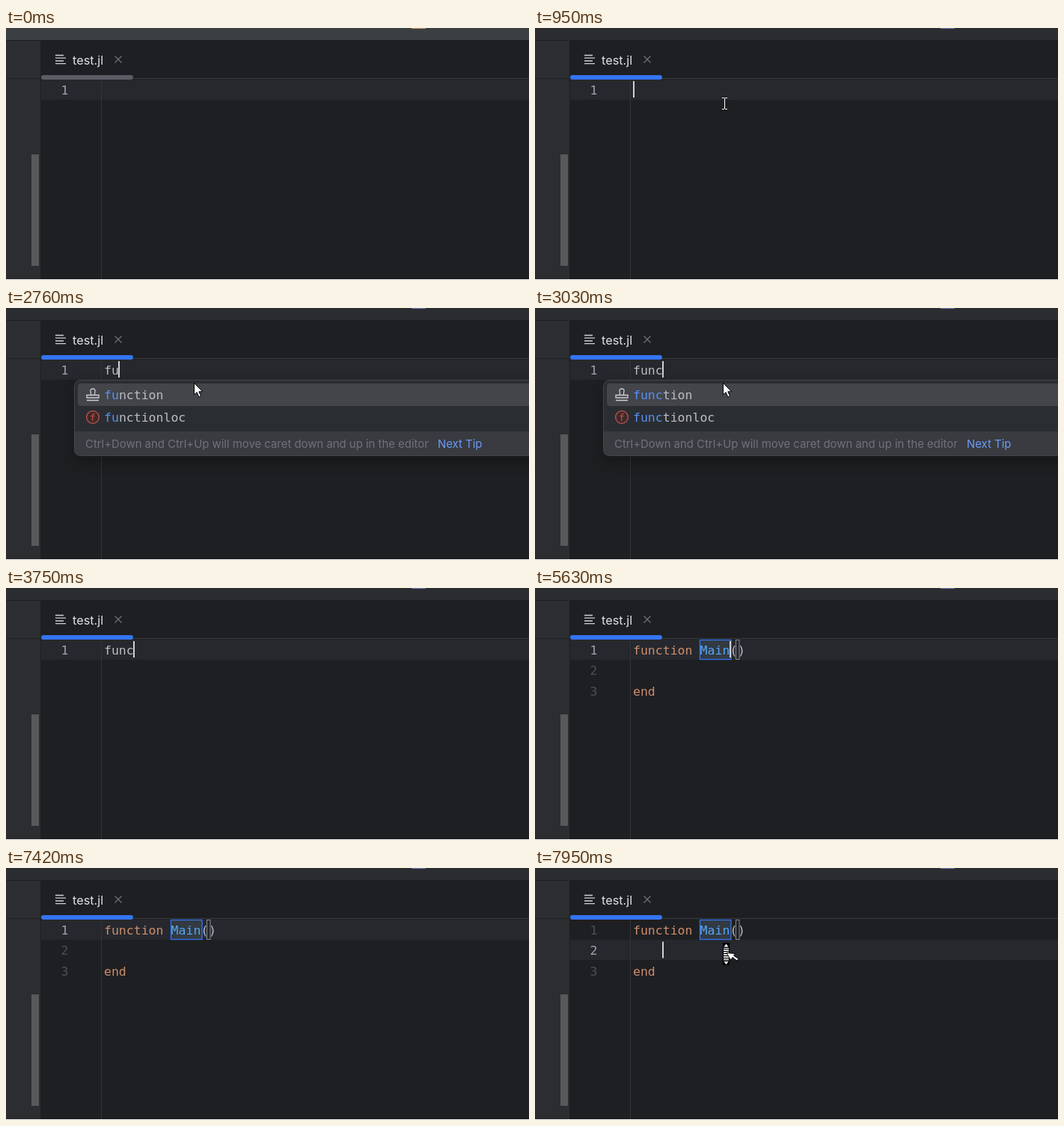
Recreate the animation shown at these times as an HTML page. Size 699 by 337 pixels, loop 8 s.

```html
<!DOCTYPE html>
<html lang="en">
<head>
<meta charset="utf-8">
<title>Editor completion</title>
<style>
  html, body { margin: 0; width: 100%; height: 100%; overflow: hidden; background: #fff; }
  svg { display: block; }
  text { white-space: pre; }
  .mono { font: 16.5px "DejaVu Sans Mono", monospace; fill: #bcbec4; }
  .ui { font: 16.25px Inter, sans-serif; fill: #dfe1e5; }
  .tip { font: 14.9px Inter, sans-serif; fill: #6f737a; }
  .kw { fill: #cf8e6d; }
  .match { fill: #5a90f5; }
  .link { fill: #6b9bfa; }
  .dim { fill: #7a7e85; }
  .line { fill: none; stroke: #ced0d6; stroke-width: 1.3; }
</style>
</head>
<body>
<svg width="699" height="337" viewBox="0 0 699 337">
  <defs>
    <filter id="shadow" x="-10%" y="-40%" width="120%" height="200%">
      <feDropShadow dx="0" dy="8" stdDeviation="12" flood-color="#000" flood-opacity=".3"/>
    </filter>
    <clipPath id="stage"><rect width="699" height="336"/></clipPath>
  </defs>
  <rect width="699" height="337" fill="#fff"/>
  <g clip-path="url(#stage)">
    <rect width="699" height="336" fill="#1e1f22"/>
    <rect width="46" height="336" y="17" fill="#2b2d30"/>
    <rect id="titleBar" width="699" height="16"/>
    <rect id="titleMark" x="542" width="19" height="1" rx=".5"/>
    <rect id="lineBg" x="47" width="652" height="27" fill="#26282e"/>
    <path d="M0 67.5H46" stroke="#1e1f22"/>
    <path d="M47 67.5H699" stroke="#393b40"/>
    <path d="M127.5 69V336" stroke="#313438"/>
    <rect x="34" y="169" width="10" height="149" fill="#58595b"/>

    <path d="M66 36.5H77M66 40.2H80M66 44H77M66 47.7H80" stroke="#ced0d6" stroke-width="1.3"/>
    <text class="ui" x="89" y="49">test.jl</text>
    <path d="M145.5 37.5l9 9m0-9l-9 9" stroke="#6f737a" stroke-width="1.2"/>
    <rect id="tabLine" x="47" y="63" width="123" height="6" rx="3"/>

    <g id="numbers"></g>
    <text id="typed" class="mono" x="131" y="89"></text>
    <g id="snippet">
      <text class="mono kw" x="131" y="89">function</text>
      <text class="mono kw" x="131" y="144">end</text>
      <rect id="nameBox" x="220.5" y="69.5" height="26" stroke="#3574f0" stroke-width="1.3"/>
      <text id="name" class="mono" x="220.6" y="89" style="fill:#56a8f5"></text>
      <g id="parens">
        <text class="mono" x="260.4" y="89">(</text>
        <text class="mono" x="271" y="89">)</text>
        <rect x="268.5" y="69.5" width="4.5" height="26" fill="none" stroke="#868a91"/>
      </g>
    </g>
    <rect id="caret" width="2" height="22" fill="#ced0d6"/>

    <path id="opening" d="M92 340V105Q92 97 100 97H705" fill="none" stroke="#43454a" stroke-width="2"/>
    <g id="popups"></g>

    <path id="beam" d="M0 .5H3M4 .5H7M3.5 1V15M0 15.5H3M4 15.5H7" fill="none" stroke="#fff"/>
    <path id="arrow" transform="translate(251.5 100.5)" fill="#fff" stroke="#000"
      d="M0 0V15.5L3.6 12.2L6.4 18.5L9 17.4L6.3 11.3H11.2Z"/>
    <g id="drag">
      <rect x="251" y="100" width="9" height="30" fill="#000"/>
      <path d="M252.5 105.5h6l-3-4ZM252.5 125h6l-3 4Z" fill="#fff"/>
      <path d="M252 107.5h7M252 123h7" stroke="#fff"/>
      <path d="M255.5 109V122" stroke="#ddd" stroke-width="7" stroke-dasharray="2 1"/>
      <path d="M256 113.5L268 114.5L265.5 117L272 121.5L270 124L264 119.5L261.5 123Z" fill="#fff" stroke="#000"/>
    </g>
  </g>
</svg>
<script>
const LOOP = 8000, ADVANCE = 9.95;
const el = id => document.getElementById(id);
const show = (id, on) => el(id).style.display = on ? "" : "none";
const between = (t, a, b) => t >= a && t < b;
// Value of the last [time, value] pair already reached.
const at = (t, steps) => steps.reduce((v, [time, next]) => t >= time ? next : v, steps[0][1]);
const caretX = column => Math.round(130.5 + ADVANCE * column);

const badge = (y, letter, color, fill) => `
  <circle cx="116" cy="${y}" r="8.3" fill="${fill}" stroke="${color}" stroke-width="1.3"/>
  <text x="116" y="${y + 4.5}" text-anchor="middle" font-size="13"
    font-family="DejaVu Sans Mono, monospace" fill="${color}">${letter}</text>`;

const stamp = `<path class="line" d="M113.5 116V114Q111.5 108 116 108T118.5 114V116
  M108 120V116.5H124V120ZM108 123.5H124"/>`;

const folder = `<path class="line" d="M117 152.5H110Q108 152.5 108 150.5V141.5Q108 139.5 110 139.5H113.5L116 142
  H121.5Q123.5 142 123.5 144V147"/>
  <rect x="118" y="148.5" width="7.5" height="7" rx="1.5" fill="#25324d" stroke="#548af7" stroke-width="1.3"/>`;

function popup(id, dx, icons, rows) {
  const items = rows.map(([word, note], i) => `
    <text class="mono" x="131" y="${122 + 30 * i}"><tspan class="match"></tspan><tspan
      data-word="${word}"></tspan></text>
    <text class="mono dim" x="261" y="${122 + 30 * i}">${note || ""}</text>`).join("");
  return `<g id="${id}" transform="translate(${dx} 0)">
    <rect x="91.5" y="96.5" width="660" height="101" rx="8" fill="#2b2d30" filter="url(#shadow)"/>
    <path d="M91.5 165H752V197.5H99.5Q91.5 197.5 91.5 189.5Z" fill="#393b40"/>
    <rect x="91.5" y="96.5" width="660" height="101" rx="8" fill="none" stroke="#43454a"/>
    <rect x="96" y="101" width="650" height="30" rx="4" fill="#43454a"/>
    ${icons}${items}
    <text class="tip" x="106" y="187">Ctrl+Down and Ctrl+Up will move caret down and up in the editor</text>
    <text class="tip link" x="577" y="187">Next Tip</text>
  </g>`;
}

function setMatch(id, length) {
  el(id).querySelectorAll("[data-word]").forEach(rest => {
    rest.previousElementSibling.textContent = rest.dataset.word.slice(0, length);
    rest.textContent = rest.dataset.word.slice(length);
  });
}

el("numbers").innerHTML = [89, 116, 144].map((y, i) =>
  `<text class="mono" x="83.5" y="${y}" text-anchor="end">${i + 1}</text>`).join("");
el("popups").innerHTML =
  popup("keywords", 0, stamp + badge(146, "f", "#c75450", "#402929"),
    [["function"], ["functionloc"]]) +
  popup("modules", 90, badge(116, "m", "#d2694f", "#45322b") + folder,
    [["Main"], ["MainInclude", "This is an unexported symbol and will"]]);
setMatch("modules", 4);

function drawPointer(t) {
  const step = Math.min(6, Math.floor((t - 190) / 70)) / 6;
  const left = (1 - step) ** 1.5;
  el("beam").setAttribute("transform",
    `translate(${Math.round(250 + 113 * left)} ${Math.round(93 + 104 * left)})`);
  show("beam", between(t, 190, 2420) || between(t, 3890, 4900) || between(t, 7550, 7880));
  show("arrow", between(t, 2560, 3750) || between(t, 5700, 7420));
  show("drag", t >= 7950);
}

function draw(t) {
  const active = t >= 950;
  el("titleBar").setAttribute("fill", active ? "#2b2d30" : "#3c3f41");
  el("titleMark").setAttribute("fill", active ? "#6f7fb5" : "#c79a6b");
  el("tabLine").setAttribute("fill", active ? "#3574f0" : "#5a5d63");

  const expanded = t >= 3890;
  const typed = at(t, [[0, 0], [2420, 1], [2700, 2], [2840, 3], [2970, 4]]);
  const name = at(t, [[0, 0], [4900, 1], [5290, 2], [5360, 3], [5630, 4]]);
  const line = t >= 7880 ? 1 : 0;
  const modules = between(t, 5700, 7420);

  el("typed").textContent = "func".slice(0, typed);
  show("typed", !expanded);
  show("snippet", expanded);
  el("name").textContent = "Main".slice(0, name);
  el("nameBox").setAttribute("width", 1.5 + name * 10);
  el("nameBox").setAttribute("fill", name && !modules ? "#323a42" : "none");
  el("parens").setAttribute("transform", `translate(${(name - 4) * ADVANCE} 0)`);

  el("lineBg").setAttribute("y", 69 + 27 * line);
  [...el("numbers").children].forEach((number, i) => {
    number.style.fill = i === line ? "#a1a3ab" : "#4b5059";
    number.style.display = i && !expanded ? "none" : "";
  });

  const column = line ? 4 : expanded ? 9 + name : typed;
  el("caret").setAttribute("x", caretX(column));
  el("caret").setAttribute("y", line ? 98.5 : 71);
  show("caret", at(t, [[0, false], [950, true], [1890, false], [2420, true], [4440, false],
    [4900, true], [6420, false], [6880, true], [7420, false], [7880, true]]));

  show("opening", between(t, 2560, 2640));
  show("keywords", between(t, 2640, 3750));
  show("modules", modules);
  setMatch("keywords", typed);
  drawPointer(t);
}

const start = performance.now();
function tick() {
  draw((performance.now() - start) % LOOP);
  requestAnimationFrame(tick);
}
tick();
</script>
</body>
</html>
```
